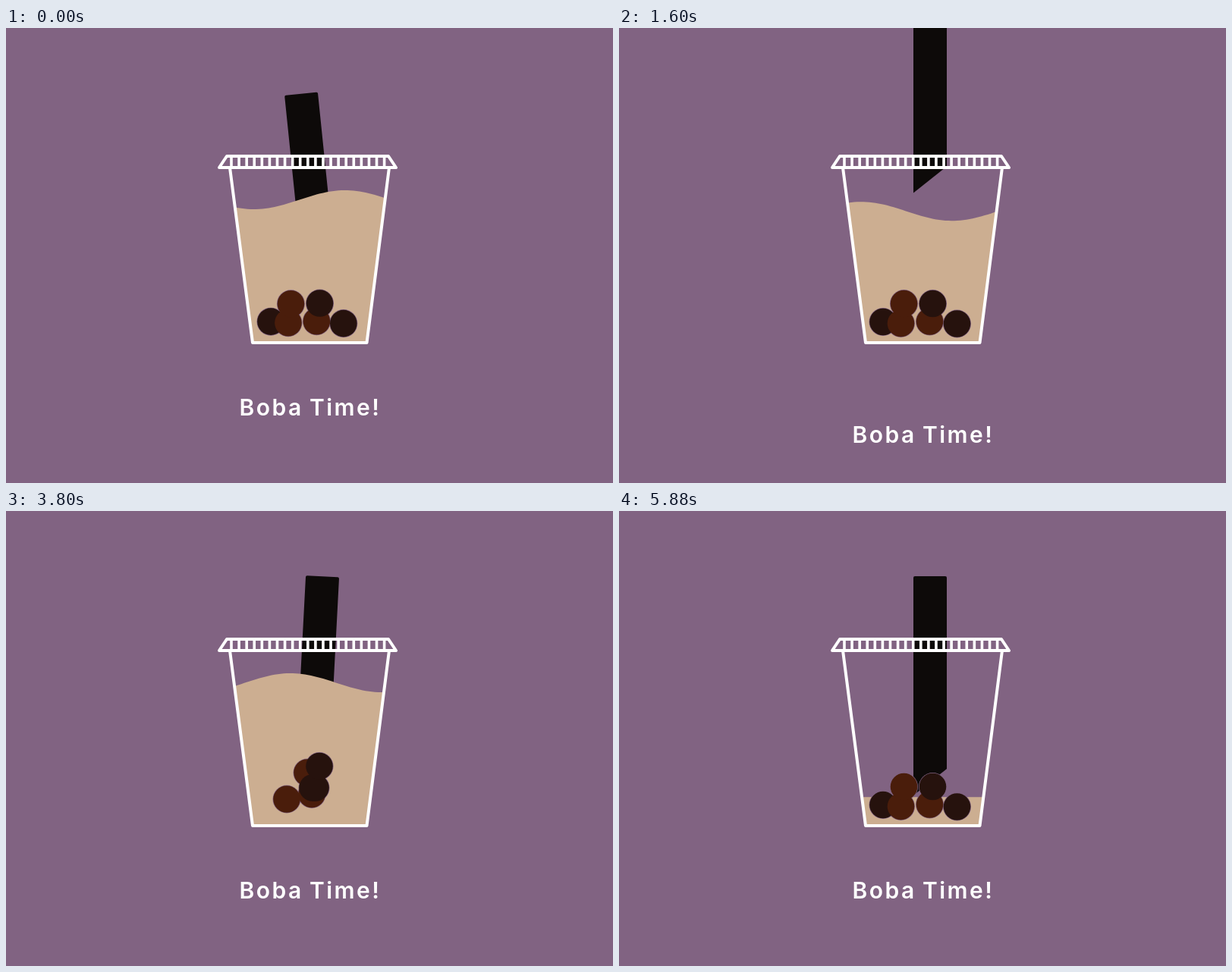
Write an HTML page that moves like this. It is 800 px wide and 600 px high and loops after 5.92 s.

```html
<!DOCTYPE html>
<html lang="en">
<head>
<meta charset="utf-8">
<title>Boba Time</title>
<style>
  html, body { margin: 0; width: 100%; height: 100%; overflow: hidden; background: #816382; }
  svg { display: block; width: 100vw; height: 100vh; }
  .line { fill: none; stroke: #fff; stroke-width: 4; stroke-linejoin: round; stroke-linecap: round; }
  #ribs { stroke-width: 3.6; stroke-linecap: butt; }
  text {
    font: 600 30px Inter, Roboto, sans-serif;
    letter-spacing: 2.5px; word-spacing: -2px;
    fill: #fff; text-anchor: middle;
  }
</style>
</head>
<body>
<svg viewBox="0 0 800 600">
  <clipPath id="inside"><path d="M295 184H505L475.5 415H325Z"/></clipPath>
  <path id="straw" fill="#0d0a09" d="M390 86H430Q432 86 432 88V340L388 375V88Q388 86 390 86Z"/>
  <g clip-path="url(#inside)"><path id="tea" fill="#ccae91"/></g>
  <g id="halos"></g>
  <g id="pearls"></g>
  <path id="cup" class="line" pathLength="1" d="M325 415L295 184H505L475.5 415Z"/>
  <g id="lid">
    <path class="line" d="M291 169H504L514 184H281Z"/>
    <path id="ribs" class="line"/>
  </g>
  <text id="title" x="401">Boba Time!</text>
</svg>
<script>
const LOOP = 5920, STEP = 40, POSTER = 4585;
const WAVELENGTH = 240, WAVE_SPEED = 0.52, WAVE_HEIGHT = 12.5;
const BROWN = '#4a1d0b', BLACK = '#26120d', PURPLE = '#816382';

const $ = id => document.getElementById(id);
const set = (el, attrs) => { for (const k in attrs) el.setAttribute(k, attrs[k]); };
const ramp = (t, from, to) => Math.min(1, Math.max(0, (t - from) / (to - from)));
const ease = (t, from, to) => { const u = ramp(t, from, to); return u * u * (3 - 2 * u); };
const easeOut = (t, from, to) => 1 - (1 - ramp(t, from, to)) ** 3;
const mix = (a, b, u) => a + (b - a) * u;

function circle(parent, r, fill) {
  const dot = document.createElementNS('http://www.w3.org/2000/svg', 'circle');
  set(dot, { r, fill });
  return $(parent).appendChild(dot);
}

// Back to front: colour, resting place and two places visited while floating.
const pearls = [
  [BROWN, [409.5, 387], [436, 360], [403, 373.5]],
  [BLACK, [348, 387.5], [372, 369], [408, 365]],
  [BROWN, [371.5, 389.5], [376.5, 347], [397, 345]],
  [BLACK, [445.5, 390], [409, 381.5], [404, 365]],
  [BROWN, [375.5, 363.5], [387, 380], [370, 380]],
  [BLACK, [413.5, 363.5], [403, 357], [413, 336.5]]
].map(([color, ...stops]) => ({
  stops,
  depth: 390 - stops[0][1],
  dots: [circle('halos', 18.5, PURPLE), circle('pearls', 17.8, color)]
}));

// The lowest pearls land first and lift off first; they rise before they drift.
function place({ stops: [rest, a, b], depth }, t) {
  const lift = 1950 + 12 * depth;
  const travel = (axis, out) =>
    mix(mix(mix(rest[axis], a[axis], out), b[axis], ease(t, 2960, 3800)), rest[axis], ease(t, 3800, 4650));
  const x = travel(0, ease(t, lift, 2960));
  const y = travel(1, easeOut(t, lift, 2960));

  const start = 300 + 9 * depth;
  const fall = ramp(t, start, start + 260), hop = ramp(t, start + 260, start + 400);
  return [x, y - (y + 30) * (1 - fall * fall) - 16 * hop * (1 - hop)];
}

// A damped swing that carries the straw past its resting height once.
function strawDrop(t) {
  const s = Math.max(0, t - 1425);
  return -400 * Math.exp(-0.0041 * s) * Math.cos(0.00361 * s);
}

let ribs = '';
for (let i = 0; i < 21; i++) ribs += `M${297 + i * 10.08} 169v15`;
set($('ribs'), { d: ribs });

function draw(t) {
  const calm = 1 - ease(t, 4600, 5040);
  const crest = 911 - WAVE_SPEED * t;
  const wave = x => Math.cos(2 * Math.PI * (x - crest) / WAVELENGTH);
  const level = mix(432, 226.5, ease(t, 700, 1780)) + 0.162 * Math.max(0, t - 4950);

  let surface = 'M290 420';
  for (let x = 290; x <= 510; x += 4) surface += `L${x} ${level - WAVE_HEIGHT * calm * wave(x)}`;
  set($('tea'), { d: surface + 'L510 420Z' });

  const sway = wave(335) * ramp(t, 1900, 2600) * calm;
  set($('straw'), {
    transform: `translate(${-5 * sway * sway} ${strawDrop(t)}) rotate(${6 * sway} 410 245)`
  });

  for (const pearl of pearls) {
    const [cx, cy] = place(pearl, t);
    pearl.dots.forEach(dot => set(dot, { cx, cy }));
  }

  const drawn = ramp(t, 40, 520);
  set($('cup'), {
    'stroke-dasharray': drawn < 1 ? `${drawn} 2` : 'none',
    visibility: drawn > 0 ? 'visible' : 'hidden'
  });

  const open = ramp(t, 880, 1300);
  set($('lid'), {
    transform: `translate(397.5 184) scale(${mix(0.75, 1, open)} ${open}) translate(-397.5 -184)`,
    visibility: open > 0 ? 'visible' : 'hidden'
  });

  set($('title'), { y: mix(635, 510.5, easeOut(t, 1400, 2000)) });
}

// The loop opens on a single still of the full cup.
const begin = performance.now();
function tick() {
  const t = Math.floor((performance.now() - begin) % LOOP / STEP) * STEP;
  draw(t < STEP ? POSTER : t);
  requestAnimationFrame(tick);
}
tick();
</script>
</body>
</html>
```
